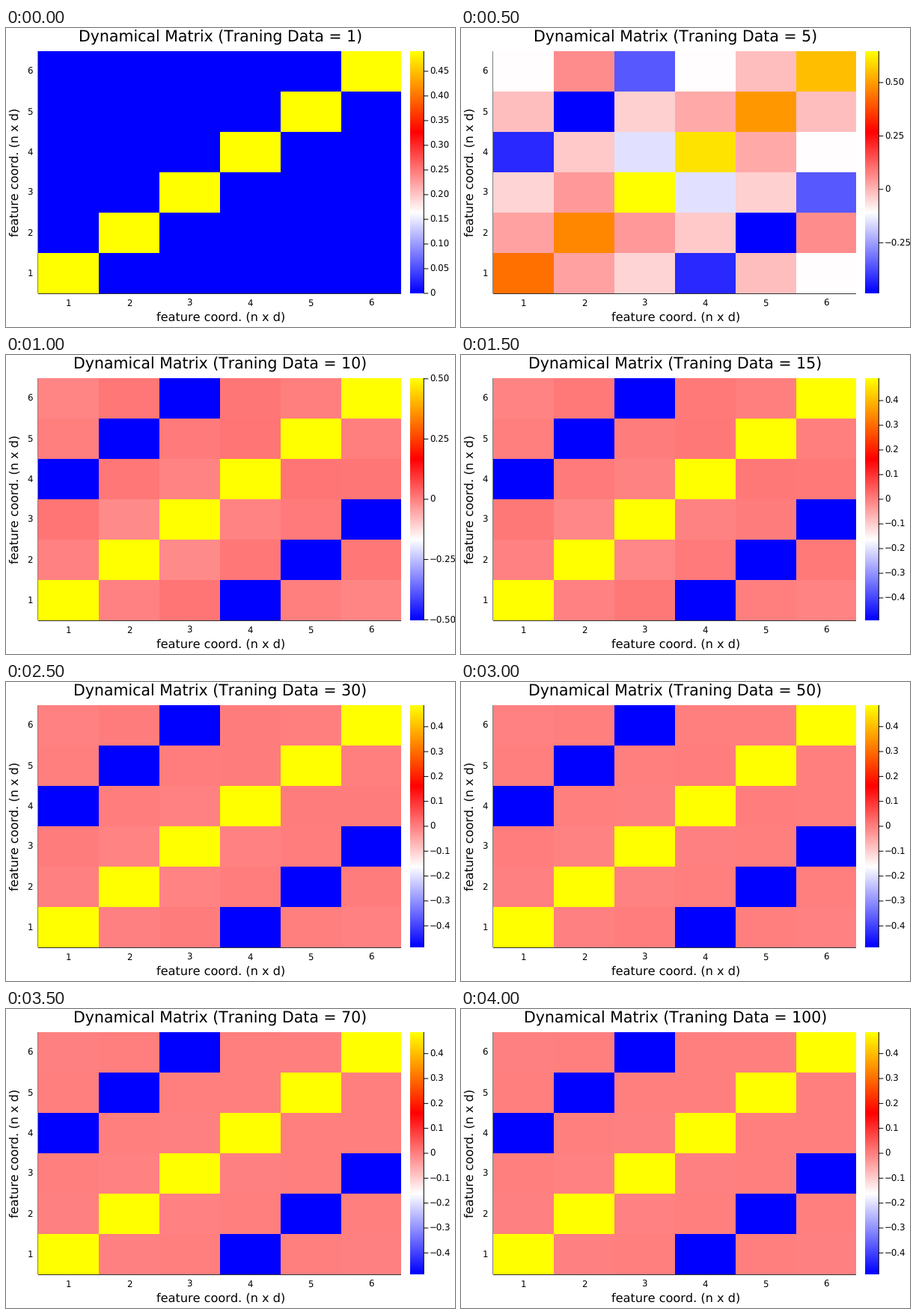
Recreate the animation shown at these times as a matplotlib script. Size 600 by 400 pixels, loop 4500 ms.

```python
import numpy as np
import matplotlib.pyplot as plt
from matplotlib.animation import FuncAnimation
from matplotlib.colors import LinearSegmentedColormap

plt.rcParams.update({
    "font.family": "DejaVu Sans",
    "text.hinting": "none",
    "text.kerning_factor": 6,
})

W, H, DPI = 600, 400, 100
LEFT, RIGHT, TOP, BOTTOM = 43, 528, 31, 355
BAR_L, BAR_R = 540, 558
CELL_W, CELL_H = 81, 54
PX = 72 / DPI
TITLE, GUIDE, TICK = 20.55 * PX, 16.1 * PX, 11.78 * PX

COUNTS = [1, 5, 10, 15, 20, 30, 50, 70, 100]
EYE = np.eye(6)
PAIRS = np.eye(6, k=3) + np.eye(6, k=-3)

# upper triangle of the early, poorly trained estimate
EARLY = [0.435, 0.031, -0.045, -0.427, -0.013, -0.105,
         0.469, 0.042, -0.028, -0.487, 0.061,
         0.647, -0.152, -0.039, -0.357,
         0.605, 0.018, -0.105,
         0.494, -0.013,
         0.552]

CMAP = LinearSegmentedColormap.from_list(
    "heat", ["#0000ff", "#ffffff", "#ff0000", "#ffff00"], N=768)


def symmetric(upper):
    m = np.zeros((6, 6))
    m[np.triu_indices(6)] = upper
    return m + np.triu(m, 1).T


NOISE = symmetric(np.random.default_rng(4).uniform(-0.02, 0.015, 21))
NOISE *= 1 - EYE - PAIRS


def matrix(count):
    if count == 1:
        return 0.4907 * EYE
    if count == 5:
        return symmetric(EARLY)
    # amplitude and noise settle as the training data grow
    q = 10 / count
    return (0.486 + 0.0165 * q ** 3) * (EYE - PAIRS) + NOISE * q


def tick_step(span):
    return next(s for s in (0.05, 0.1, 0.25) if span / s < 10)


def tick_label(value, step):
    if abs(value) < 1e-9:
        return "0"
    digits = 1 if step == 0.1 else 2
    return f"{value:.{digits}f}".replace("-", "\u2212")


fig = plt.figure(figsize=(W / DPI, H / DPI), dpi=DPI, facecolor="white")
ax = fig.add_axes([0, 0, 1, 1])
ax.axis("off")


def line(x, y, z=2):
    return ax.plot(x, y, color="black", lw=PX, solid_capstyle="butt",
                   snap=False, zorder=z)[0]


def label(x, y, text, size, ha="center", **kw):
    return ax.text(x, y, text, size=size, ha=ha, va="baseline", **kw)


k = np.arange(7)
mesh = ax.pcolormesh(np.minimum(LEFT + CELL_W * k, RIGHT), BOTTOM - CELL_H * k,
                     matrix(1), cmap=CMAP, antialiased=False,
                     edgecolors="none", zorder=1)
ax.imshow(np.linspace(1, 0, BOTTOM - TOP)[:, None], cmap=CMAP,
          extent=(BAR_L, BAR_R, BOTTOM, TOP), aspect="auto",
          interpolation="nearest")
ax.set_xlim(0, W)
ax.set_ylim(H, 0)

line([LEFT, LEFT], [TOP, BOTTOM], z=0.5)
line([LEFT, RIGHT], [BOTTOM + 0.3] * 2, z=0.5)
line([BAR_R + 0.3] * 2, [TOP, BOTTOM])

for n in range(6):
    label(LEFT + 0.3 + 80.8 * (n + 0.5), 371.5, str(n + 1), TICK)
    label(36, BOTTOM + 4.3 - CELL_H * (n + 0.5), str(n + 1), TICK, "right")

GUIDE_TEXT = "feature coord. (n x d)"
label(286.8, 392, GUIDE_TEXT, GUIDE)
label(16.5, 192.7, GUIDE_TEXT, GUIDE, rotation=90, rotation_mode="anchor")
title = label(286.3, 18.6, "", TITLE)

bar_ticks = []


def update(i):
    count = COUNTS[i]
    data = matrix(count)
    lo, hi = data.min(), data.max()
    mesh.set_array(data)
    mesh.set_clim(lo, hi)
    title.set_text(f"Dynamical Matrix (Traning Data = {count})")

    while bar_ticks:
        bar_ticks.pop().remove()
    step = tick_step(hi - lo)
    for n in range(int(np.ceil(lo / step)), int(np.floor(hi / step)) + 1):
        value = n * step
        y = BOTTOM - (value - lo) / (hi - lo) * (BOTTOM - TOP)
        bar_ticks.append(line([BAR_R, BAR_R + 6.3], [y, y]))
        bar_ticks.append(label(566, y + 4.3, tick_label(value, step),
                               TICK, "left"))
    return [mesh, title, *bar_ticks]


def init():
    return update(0)


anim = FuncAnimation(fig, update, frames=len(COUNTS), init_func=init,
                     interval=500, repeat=True, repeat_delay=0, blit=False)
plt.show()
```
